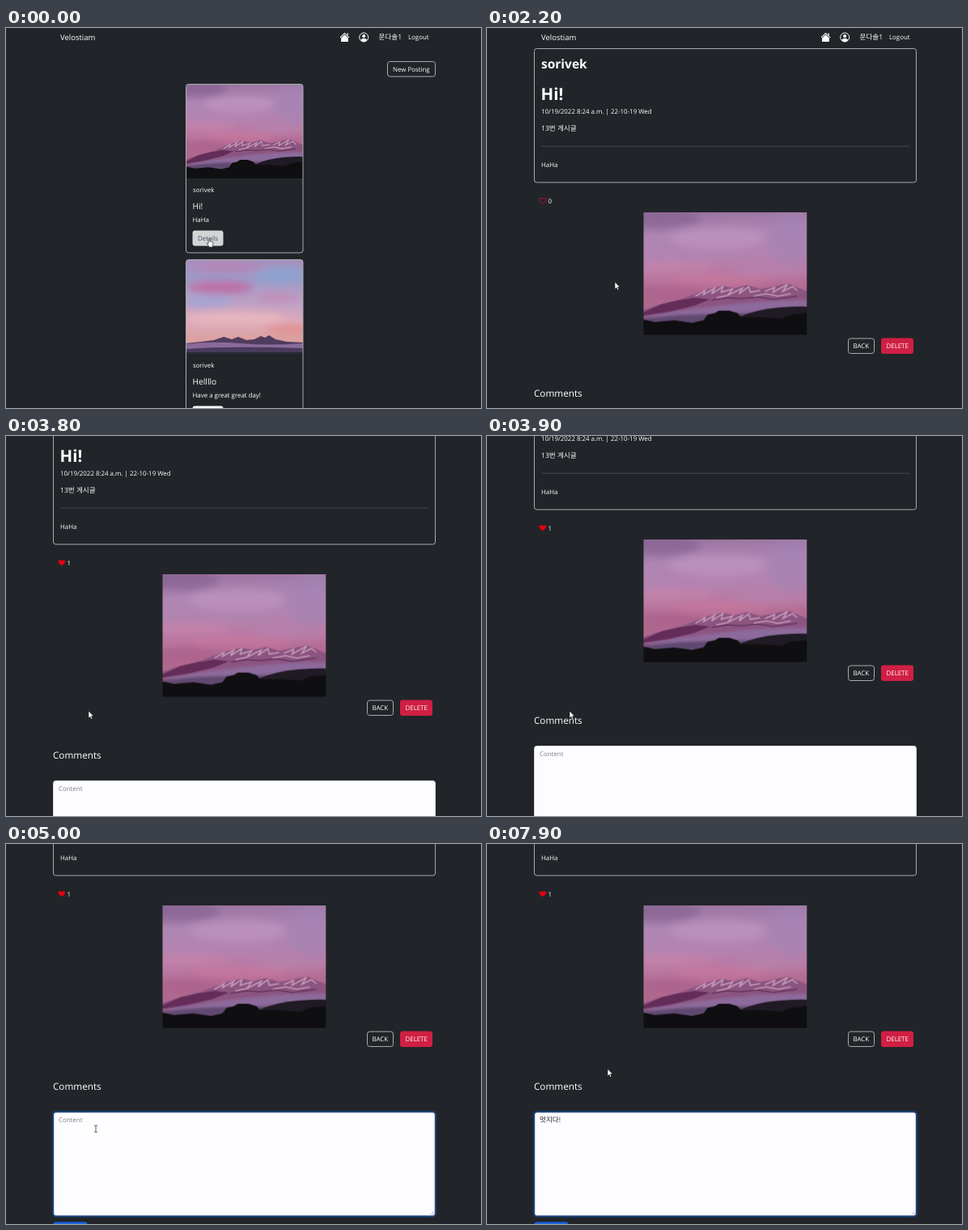
Recreate the animation shown at these times as an HTML page. Size 587 by 470 pixels, loop 8 s.

```html
<!DOCTYPE html>
<html lang="ko">
<head>
<meta charset="utf-8">
<title>Photo board</title>
<style>
html, body { margin: 0; width: 100%; height: 100%; overflow: hidden; background: #212529; }
svg { display: block; }
text { font: 500 7.9px "Open Sans", "Noto Sans CJK KR", "Noto Sans CJK", sans-serif; fill: #fff; text-rendering: geometricPrecision; }
.ko { font-size: 8.6px; }
.brand { font-size: 9.5px; }
.h5 { font-size: 10.2px; }
.h4 { font-size: 11.7px; }
.h2 { font-size: 15.5px; font-weight: 700; }
.h1 { font-size: 20.5px; font-weight: 700; }
.dark { fill: #212529; font-weight: 400; }
.hint { fill: #7d8287; font-weight: 400; }
.line { fill: none; stroke: #a9abad; }

/* every change lands on a 100 ms tick, so all tracks are stepped */
.list, .post, .page, .label, .empty, .full, .ring, .typed, .caret, .cursor, .hand, .arrow, .beam {
  animation: 8s step-end infinite;
}
.list { animation-name: list; }
.post { animation-name: post; }
.page { animation-name: scroll; }
.label { animation-name: label; }
.empty { animation-name: empty; }
.full { animation-name: full; }
.ring { animation-name: ring; }
.typed { animation-name: type; }
.caret { animation-name: caret; }
.cursor { animation-name: move; }
.hand { animation-name: hand; }
.arrow { animation-name: arrow; }
.beam { animation-name: beam; }

@keyframes list { 0% { opacity: 1 } 7.5% { opacity: 0 } }
@keyframes post { 0% { opacity: 0 } 7.5% { opacity: 1 } }
@keyframes label { 0% { fill: #414b63 } 1.25% { fill: #212529 } }
@keyframes empty { 0% { opacity: 1 } 38.75% { opacity: 0 } }
@keyframes full { 0% { opacity: 0 } 38.75% { opacity: 1 } }
@keyframes scroll {
  0% { transform: none }
  46.25% { transform: translateY(-19px) }
  47.5% { transform: translateY(-57px) }
  48.75% { transform: translateY(-100px) }
  50% { transform: translateY(-131px) }
  51.25% { transform: translateY(-147px) }
  52.5% { transform: translateY(-152px) }
}
@keyframes ring { 0% { opacity: 0 } 55% { opacity: .6 } 56.25% { opacity: 1 } }
@keyframes type {
  0% { transform: none }
  76.25% { transform: translateY(-20px) }
  77.5% { transform: translateY(-40px) }
  78.75% { transform: translateY(-60px) }
  80% { transform: translateY(-80px) }
  82.5% { transform: translateY(-100px) }
  83.75% { transform: translateY(-120px) }
  87.5% { transform: translateY(-140px) }
}
@keyframes caret {
  0% { opacity: 0 }
  53.75% { opacity: 1; transform: none }
  61.25% { opacity: 0 }
  65% { opacity: 1; transform: none }
  71.25% { opacity: 0 }
  76.25% { opacity: 1; transform: translateX(8px) }
  80% { opacity: 1; transform: translateX(16px) }
  83.75% { opacity: 1; transform: translateX(24px) }
  87.5% { opacity: 1; transform: translateX(26.5px) }
  93.75% { opacity: 0 }
}
@keyframes move {
  0% { transform: translate(251px, 260px) }
  7.5% { transform: translate(248px, 260px) }
  25% { transform: translate(239px, 268px) }
  26.25% { transform: translate(204px, 293px) }
  27.5% { transform: translate(158px, 314px) }
  28.75% { transform: translate(120px, 291px) }
  30% { transform: translate(91px, 250px) }
  31.25% { transform: translate(75px, 222px) }
  32.5% { transform: translate(68px, 213px) }
  46.25% { transform: translate(90px, 288px) }
  47.5% { transform: translate(102px, 340px) }
  50% { transform: translate(106px, 345px) }
  51.25% { transform: translate(109px, 350px) }
  52.5% { transform: translate(111px, 352px) }
  97.5% { transform: translate(127px, 312px) }
  98.75% { transform: translate(149px, 278px) }
}
@keyframes hand { 0% { opacity: 1 } 7.5% { opacity: 0 } 32.5% { opacity: 1 } 46.25% { opacity: 0 } }
@keyframes arrow {
  0% { opacity: 0 } 7.5% { opacity: 1 } 32.5% { opacity: 0 }
  46.25% { opacity: 1 } 51.25% { opacity: 0 } 97.5% { opacity: 1 }
}
@keyframes beam { 0% { opacity: 0 } 51.25% { opacity: 1 } 97.5% { opacity: 0 } }
</style>
</head>
<body>
<svg width="587" height="470" viewBox="0 0 587 470">
  <defs>
    <linearGradient id="dusk" x2=".06" y2="1">
      <stop stop-color="#9a73a0"/>
      <stop offset=".2" stop-color="#ae86b3"/>
      <stop offset=".4" stop-color="#b483b0"/>
      <stop offset=".56" stop-color="#bb769f"/>
      <stop offset=".7" stop-color="#b0688f"/>
    </linearGradient>
    <linearGradient id="dawn" x2="0" y2="1">
      <stop stop-color="#a890bd"/>
      <stop offset=".2" stop-color="#9d9ac8"/>
      <stop offset=".45" stop-color="#bda0c4"/>
      <stop offset=".65" stop-color="#dcaabb"/>
      <stop offset=".85" stop-color="#dba09f"/>
    </linearGradient>
    <filter id="soft" x="-30%" y="-80%" width="160%" height="260%"><feGaussianBlur stdDeviation="5"/></filter>
    <filter id="mist" x="-10%" y="-40%" width="120%" height="180%"><feGaussianBlur stdDeviation="1.6"/></filter>
    <path id="heart" d="M8 14.5C-6 6 3-1 8 4C13-1 22 6 8 14.5z"/>

    <symbol id="peak" viewBox="0 0 202 152" preserveAspectRatio="none">
      <path fill="url(#dusk)" d="M0 0h202v152H0z"/>
      <g filter="url(#soft)" opacity=".5">
        <ellipse cx="20" cy="8" rx="50" ry="12" fill="#7c5a88"/>
        <ellipse cx="185" cy="30" rx="34" ry="34" fill="#a283b4"/>
        <ellipse cx="92" cy="32" rx="60" ry="14" fill="#c59ac6"/>
        <ellipse cx="30" cy="68" rx="56" ry="7" fill="#cf86ab"/>
        <ellipse cx="160" cy="72" rx="50" ry="8" fill="#b487b4"/>
        <ellipse cx="95" cy="84" rx="60" ry="5" fill="#d47a9c"/>
        <ellipse cx="30" cy="98" rx="44" ry="7" fill="#a55c8a"/>
      </g>
      <path fill="#8c5480" d="M0 121L24 113L48 107L66 100L80 95L98 91L112 94L128 90L144 95L160 92L178 88L190 93L202 98V135H0z"/>
      <path fill="none" stroke="#d3adc8" stroke-width="1.600" opacity=".8" d="M64 104L76 97L74 102L88 94L84 101L98 92L96 99L110 95L104 103L122 94L118 101L130 92L132 99L144 97M150 98L162 93L160 99L178 89L172 98L184 92L190 97M90 106L104 103M136 104L152 101L166 104L182 101"/>
      <path fill="#642c58" d="M0 124L22 114L44 109L64 106L82 108L62 116L30 124L0 128z"/>
      <path fill="none" stroke="#64365f" stroke-width="1.600" d="M84 109L104 106L120 107L142 105L160 108L190 104"/>
      <g filter="url(#mist)">
        <path fill="#8c6b9c" d="M0 130Q40 122 74 118T128 112T202 109V130H0z"/>
        <path fill="#61486f" d="M0 132Q40 126 84 126T202 120V138H0z"/>
      </g>
      <path fill="#201a24" d="M118 130Q140 120 168 118T202 117V140H118z"/>
      <path fill="#0f0e11" d="M0 133L14 136L38 134L60 137L74 134L79 127L88 125L93 122L106 122L116 125L121 130L146 130L170 132L182 127L202 125V152H0z"/>
    </symbol>

    <symbol id="coast" viewBox="0 0 144 116" preserveAspectRatio="none">
      <path fill="url(#dawn)" d="M0 0h144v116H0z"/>
      <g filter="url(#soft)">
        <ellipse cx="116" cy="18" rx="34" ry="9" fill="#8ea2cf"/>
        <ellipse cx="26" cy="50" rx="30" ry="8" fill="#a6a5d2"/>
        <ellipse cx="42" cy="34" rx="40" ry="8" fill="#bd6fa6"/>
        <ellipse cx="52" cy="9" rx="46" ry="5" fill="#b883b4"/>
        <ellipse cx="112" cy="46" rx="26" ry="5" fill="#c48cb8"/>
        <ellipse cx="60" cy="72" rx="64" ry="8" fill="#e6b5be"/>
        <ellipse cx="126" cy="86" rx="28" ry="6" fill="#e0918f"/>
      </g>
      <path fill="#4f3c5e" d="M0 103L18 101L34 99L46 95L56 98L64 95L74 99L84 98L92 94L97 96L102 93L110 98L124 101L144 102V110H0z"/>
      <path fill="#8a6a9a" d="M0 104Q30 100 66 103T144 103V112H0z"/>
      <path fill="#4a3a5c" d="M0 110Q50 106 144 109V116H0z"/>
      <path fill="#2c2838" d="M0 114H144V116H0z"/>
    </symbol>

    <g id="nav">
      <text class="brand" x="67" y="15">Velostiam</text>
      <path fill="#fff" d="M418.500 5.800L424.400 11.600L423.700 12.300L418.500 7.200L413.300 12.300L412.600 11.600zM421.500 6.500h1.400v3l-1.400-1.400zM418.500 8.200L422.900 12.500V17H414.100V12.500z"/>
      <circle cx="442.200" cy="11.500" r="5.500" fill="none" stroke="#fff"/>
      <circle cx="442.200" cy="10" r="2.100" fill="#fff"/>
      <path fill="#fff" d="M438.200 15Q439.400 12.800 442.200 12.800T446.200 15Q444.600 17 442.200 17T438.200 15z"/>
      <text class="ko" x="460.500" y="13.500">문다솔1</text>
      <text x="497" y="13.500">Logout</text>
    </g>
  </defs>

  <g class="list">
    <use href="#nav"/>
    <rect class="line" x="471.500" y="41.500" width="59" height="18.500" rx="3"/>
    <text x="478" y="53.600">New Posting</text>

    <use href="#peak" x="223" y="70" width="144" height="116"/>
    <rect class="line" x="222.500" y="69.500" width="144.500" height="208.500" rx="3"/>
    <text x="231" y="203">sorivek</text>
    <text class="h5" x="230.500" y="224">Hi!</text>
    <text x="230.500" y="239.500">HaHa</text>
    <rect x="230.500" y="250.500" width="38" height="19" rx="3" fill="#d3d4d5"/>
    <text class="label" x="237" y="263">Details</text>

    <use href="#coast" x="223" y="287" width="144" height="116"/>
    <rect class="line" x="222.500" y="286.500" width="144.500" height="208.500" rx="3"/>
    <text x="231" y="420">sorivek</text>
    <text class="h5" x="230.500" y="441">Hellllo</text>
    <text x="230.500" y="456.500">Have a great great day!</text>
    <rect x="230.500" y="467.500" width="38" height="19" rx="3" fill="#f8f9fa"/>
  </g>

  <g class="post">
    <g class="page">
      <use href="#nav"/>
      <rect class="line" x="58.500" y="25.500" width="472" height="165.500" rx="3"/>
      <text class="h2" x="67" y="49.500">sorivek</text>
      <text class="h1" x="66.500" y="89.200">Hi!</text>
      <text x="67" y="106.300">10/19/2022 8:24 a.m. | 22-10-19 Wed</text>
      <text class="ko" x="67" y="126.800">13번 게시글</text>
      <path d="M67 146.200H522" stroke="#45494c"/>
      <text x="67" y="171.500">HaHa</text>

      <g class="empty">
        <use href="#heart" transform="translate(64.500 209.300) scale(.54)" fill="none" stroke="#cc1033" stroke-width="1.800"/>
        <text x="75.500" y="216.500">0</text>
      </g>
      <g class="full">
        <use href="#heart" transform="translate(64.300 209) scale(.57)" fill="#e5000e"/>
        <text x="75.500" y="216.500">1</text>
      </g>

      <use href="#peak" x="193.500" y="228" width="202" height="151.500"/>
      <rect class="line" x="446.500" y="384" width="32" height="18.500" rx="3"/>
      <text x="452.500" y="396.200">BACK</text>
      <rect x="487" y="383.500" width="40" height="19.500" rx="3" fill="#d01f43"/>
      <text x="493.500" y="396.200">DELETE</text>

      <text class="h4" x="58" y="456">Comments</text>
      <rect x="58.500" y="483.500" width="472" height="128.500" rx="3" fill="#fdfcfe" stroke="#d6d8da"/>
      <path d="M525 610.500l4-4M527.500 610.500l1.500-1.500" stroke="#777" stroke-width=".6"/>
      <rect class="ring" x="58.200" y="483.200" width="472.600" height="129.200" rx="3.500" fill="none" stroke="#1a4585" stroke-width="2"/>
      <svg x="65" y="485" width="200" height="20">
        <g class="typed">
          <text class="hint" x="0" y="10.500">Content</text>
          <text class="ko dark" x="0" y="30.500">ㅁ</text>
          <text class="ko dark" x="0" y="50.500">머</text>
          <text class="ko dark" x="0" y="70.500">멋</text>
          <text class="ko dark" x="0" y="90.500">멋ㅈ</text>
          <text class="ko dark" x="0" y="110.500">멋지</text>
          <text class="ko dark" x="0" y="130.500">멋지다</text>
          <text class="ko dark" x="0" y="150.500">멋지다!</text>
        </g>
      </svg>
      <path class="caret" d="M65.500 487V498" stroke="#333" stroke-width=".8"/>
      <rect x="58.500" y="619.500" width="42" height="19" rx="3" fill="#1a62e0"/>
    </g>
  </g>

  <g class="cursor">
    <path class="arrow" d="M0 0V9L2 7.200L3.400 10.200L4.900 9.500L3.500 6.600H6.200z" fill="#fff" stroke="#111" stroke-width=".6"/>
    <path class="hand" d="M-.8 .6Q0-.6 .8 .6V4L4.200 4.700Q5.200 5 5 6.200L4.400 9.200V11H-.4V9.600L-3 6.400Q-2.600 5.200-.8 6.600z" fill="#fff" stroke="#222" stroke-width=".7"/>
    <path class="beam" d="M-2-3.800H-.6L0-3.400L.6-3.800H2M0-3.400V3.800M-2 4.200H-.6L0 3.800L.6 4.200H2" fill="none" stroke="#333" stroke-width=".8"/>
  </g>
</svg>
</body>
</html>
```
